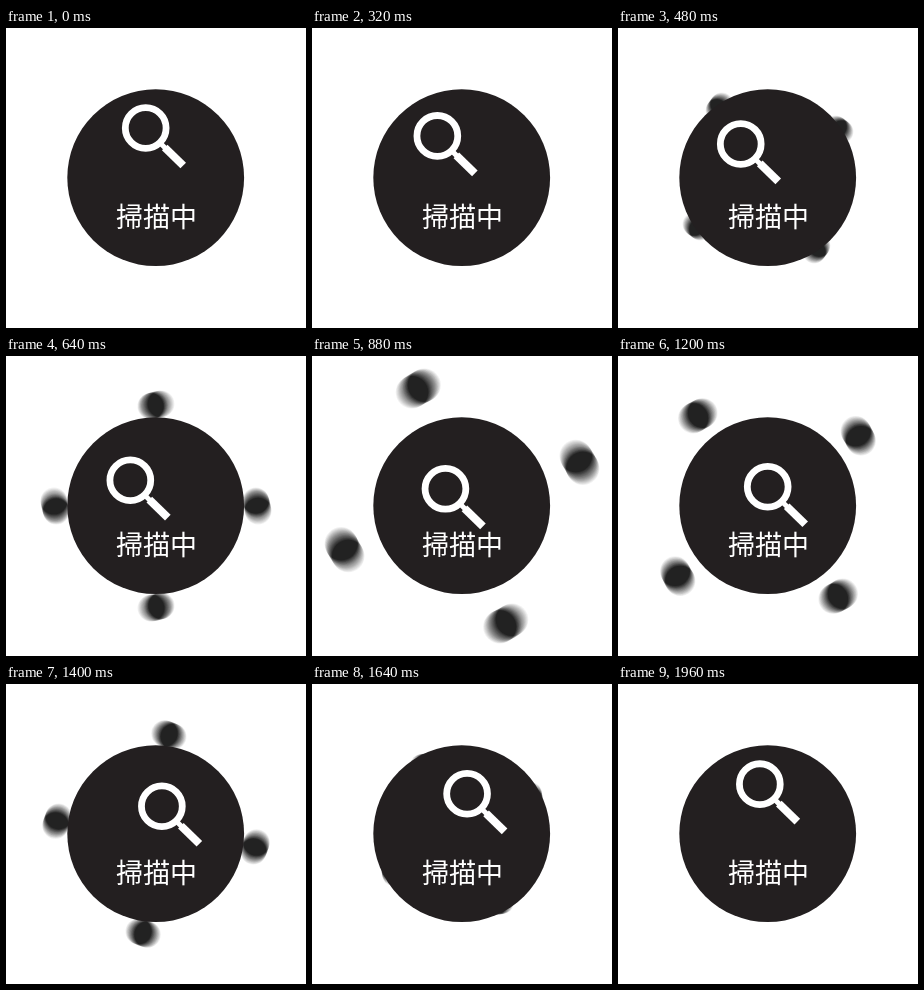
These frames come from a looping animation (300 by 300 pixels, 2 s). An HTML page with a canvas:

```html
<!DOCTYPE html>
<html lang="zh-Hant">
<head>
<meta charset="utf-8">
<style>
html, body { margin: 0; width: 100%; height: 100%; overflow: hidden; background: #fff; }
canvas { display: block; }
</style>
</head>
<body>
<canvas id="stage" width="300" height="300"></canvas>
<script>
const ctx = document.getElementById('stage').getContext('2d');
const INK = '#231f20', LOOP = 2000, STEP = 40;
const SHUTTER = 24, SAMPLES = 17;

// Ring of dots: [time, angle in degrees, radius]
const KEYS = [
  [0, -140, 38], [560, -17, 94], [640, -0.7, 101], [880, 69.8, 125.5],
  [960, 89, 133], [1040, 106, 126], [1400, 187.5, 100], [1680, 251, 76], [2000, 323, 49]
];

function ringAt(time) {
  const t = Math.min(Math.max(time, 0), LOOP);
  const i = Math.max(1, KEYS.findIndex(k => k[0] >= t));
  const [a, b] = [KEYS[i - 1], KEYS[i]];
  const p = (t - a[0]) / (b[0] - a[0]);
  return [1, 2].map(n => a[n] + (b[n] - a[n]) * p);
}

function disc(x, y, r) {
  ctx.beginPath();
  ctx.arc(x, y, r, 0, Math.PI * 2);
}

// Motion blur: the average of several moments within the shutter time
function drawDots(t) {
  ctx.globalCompositeOperation = 'lighter';
  ctx.globalAlpha = 1 / SAMPLES;
  ctx.fillStyle = INK;
  for (let s = 0; s < SAMPLES; s++) {
    const [deg, r] = ringAt(t + (s / (SAMPLES - 1) - 0.5) * SHUTTER);
    for (let q = 0; q < 4; q++) {
      const a = (deg + q * 90) * Math.PI / 180;
      disc(150 + r * Math.sin(a), 150 - r * Math.cos(a), r * 0.131);
      ctx.fill();
    }
  }
  ctx.globalCompositeOperation = 'source-over';
  ctx.globalAlpha = 1;
}

function line(from, to, width) {
  ctx.lineWidth = width;
  ctx.beginPath();
  ctx.moveTo(...from);
  ctx.lineTo(...to);
  ctx.stroke();
}

function drawLens(t) {
  const a = t / LOOP * Math.PI * 2;
  ctx.save();
  ctx.translate(139.7 - 17 * Math.sin(a), 117 - 17 * Math.cos(a));
  ctx.strokeStyle = '#fff';
  ctx.lineWidth = 6.8;
  disc(0, 0, 20.4);
  ctx.stroke();
  line([15, 15.5], [21, 21.5], 5);
  line([19, 19.5], [37.5, 37.5], 8);
  ctx.restore();
}

function draw(t) {
  ctx.clearRect(0, 0, 300, 300);
  drawDots(t);
  ctx.fillStyle = INK;
  disc(149.7, 149.7, 88.4);
  ctx.fill();
  drawLens(t);
  ctx.fillStyle = '#fff';
  ctx.font = '27px "Noto Sans CJK TC", "Noto Sans CJK", sans-serif';
  ctx.textAlign = 'center';
  ctx.fillText('掃描中', 150.5, 199);
}

const start = performance.now();
function tick() {
  const t = (performance.now() - start) % LOOP;
  draw(Math.floor(t / STEP) * STEP);
  requestAnimationFrame(tick);
}
tick();
</script>
</body>
</html>
```
